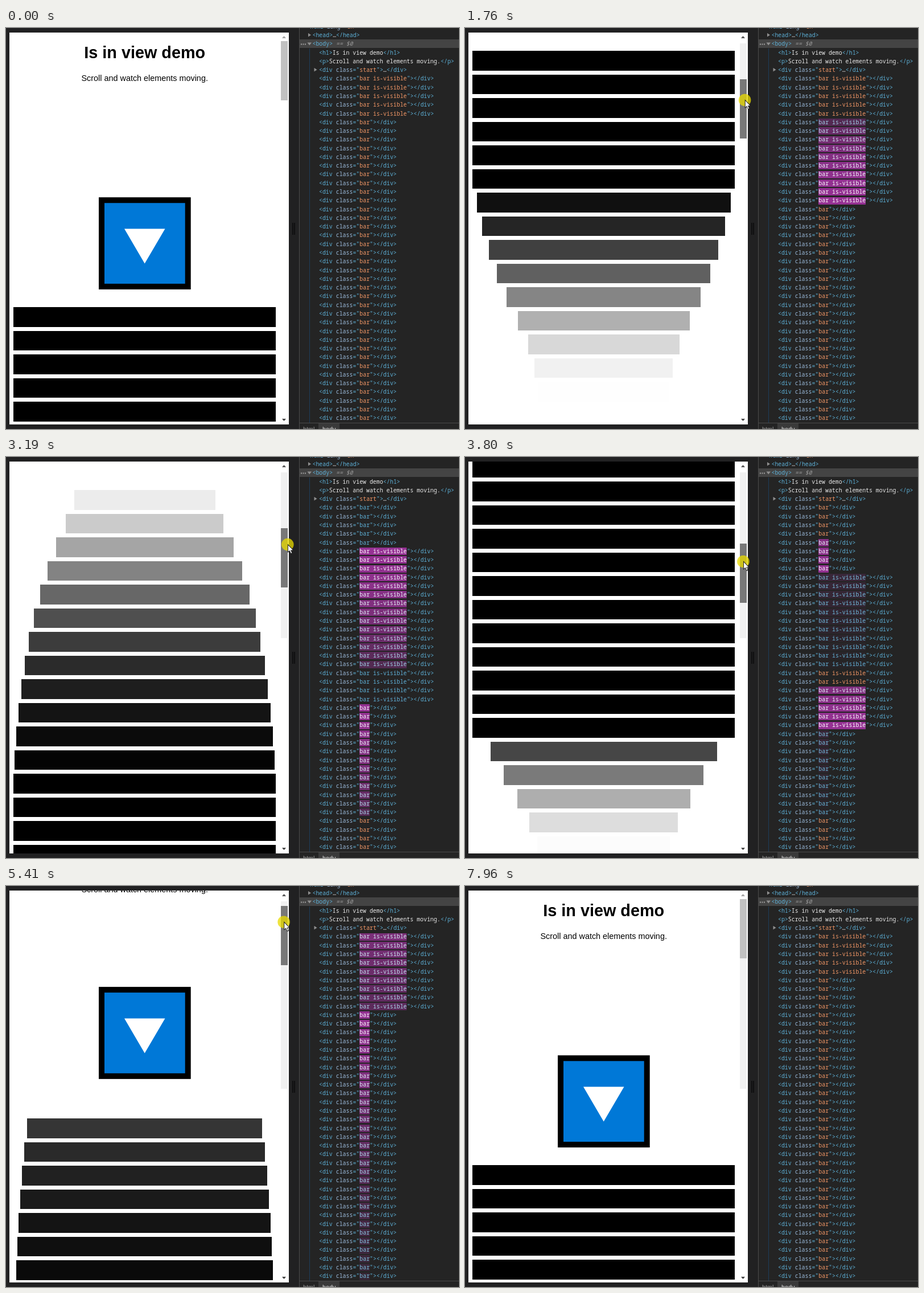
Animation, 796 px wide and 704 px high, one loop 7990 ms. Source, as an HTML page with a canvas:

```html
<!DOCTYPE html>
<html lang="en">
<head>
<meta charset="utf-8">
<title>Is in view demo</title>
<style>
html, body { margin: 0; width: 100%; height: 100%; overflow: hidden; background: #222; }
canvas { display: block; }
</style>
</head>
<body>
<canvas id="stage" width="796" height="704"></canvas>
<script>
const ctx = document.getElementById('stage').getContext('2d');
const LOOP = 7990, BARS = 50, ROWS = 40, PITCH = 41.5, ROW = 15.28, CHAR = 5.94;
const PER_THUMB = 6.69;   // page pixels per scrollbar pixel
const LAG = 52;           // delay before a class changes
const FADE = 500, FLASH = 1400;
const BLUE = '#5db0d7', NAME = '#9bbbdc', VALUE = '#f29766', LIGHT = '#e8e8e8';

// turning points of the scroll: [time, offset]
const turns = [[1200, 0], [2586, 1276], [3300, 645], [3470, 645], [3830, 866], [4377, 1533], [5592, 0]];

const mix = (a, b, k) => a + (b - a) * k;
const clamp = v => Math.min(1, Math.max(0, v));
const swing = k => (1 - Math.cos(Math.PI * k)) / 2;

// cubic-bezier(.25, .1, .25, 1)
function ease(x) {
  x = clamp(x);
  if (x === 0 || x === 1) return x;
  let lo = 0, hi = 1, u;
  for (let i = 0; i < 24; i++) {
    u = (lo + hi) / 2;
    if (.75 * u * (1 - u) + u ** 3 < x) lo = u; else hi = u;
  }
  return .3 * u * (1 - u) ** 2 + 3 * u * u * (1 - u) + u ** 3;
}

function scrollAt(t) {
  const next = turns.findIndex(([time]) => time > t);
  if (next < 1) return 0;
  const [t0, a] = turns[next - 1], [t1, b] = turns[next];
  return mix(a, b, swing((t - t0) / (t1 - t0)));
}

const thumbAt = t => 23 + scrollAt(t) / PER_THUMB;
const inView = (n, s) => s < 516 + PITCH * n && s > PITCH * n - 206;

// class changes of every bar
const changes = Array.from({ length: BARS }, (_, n) => {
  const list = [];
  let on = inView(n, 0);
  for (let t = 0; t < LOOP; t += 2) {
    if (inView(n, scrollAt(t - LAG)) !== on) list.push({ t, on: on = !on });
  }
  return list;
});

function barState(n, t) {
  let on = inView(n, 0), from = +on, at = -1e5;
  const level = now => mix(from, +on, ease((now - at) / FADE));
  for (const c of changes[n]) {
    if (c.t > t) break;
    from = level(c.t);
    on = c.on;
    at = c.t;
  }
  return { on, level: level(t), age: t - at };
}

function rect(color, x, y, w, h) {
  ctx.fillStyle = color;
  ctx.fillRect(x, y, w, h);
}

// rectangle with its edges on whole pixels
function crisp(color, x, y, w, h) {
  const left = Math.round(x), top = Math.round(y);
  rect(color, left, top, Math.round(x + w) - left, Math.round(y + h) - top);
}

function poly(color, ...pts) {
  ctx.fillStyle = color;
  ctx.beginPath();
  for (let i = 0; i < pts.length; i += 2) ctx.lineTo(pts[i], pts[i + 1]);
  ctx.closePath();
  ctx.fill();
}

function page(t, states) {
  ctx.save();
  ctx.beginPath();
  ctx.rect(6, 8, 491, 688);
  ctx.clip();
  rect('#fff', 6, 8, 491, 688);
  ctx.translate(0, -Math.round(scrollAt(t)));

  ctx.fillStyle = '#000';
  ctx.textAlign = 'center';
  ctx.font = 'bold 28.8px "Liberation Sans", Arial, sans-serif';
  ctx.fillText('Is in view demo', 243.7, 53);
  ctx.font = '14.4px "Liberation Sans", Arial, sans-serif';
  ctx.fillText('Scroll and watch elements moving.', 243.7, 93);
  ctx.textAlign = 'left';

  // bouncing button: alternate, one second each way
  const phase = (t + 1028) % 2000 / 1000;
  const y = mix(153.5, 297.3, ease(phase < 1 ? phase : 2 - phase));
  rect('#000', 163, y, 161.7, 161.7);
  rect('#0078d7', 173, y + 10, 141.7, 141.7);
  poly('#fff', 208, y + 55.3, 279.5, y + 55.3, 243.7, y + 116.3);

  states.forEach(({ level }, n) => {
    const w = 461 * (.5 + level / 2);
    ctx.globalAlpha = level;
    crisp('#000', 243.7 - w / 2, 490.2 + PITCH * n, w, 34.3);
  });
  ctx.restore();
}

function scrollbar(t) {
  const s = scrollAt(t);
  const dragged = t > 1150 && t < 5700;
  // the track shows only as far as the thumb has been
  const reached = turns.reduce((far, [time, offset]) => time <= t ? Math.max(far, offset) : far, s);
  rect('#fff', 482, 8, 15, 688);
  if (reached > 0) crisp('#f1f1f1', 483, 27, 12, 100 + reached / PER_THUMB);
  crisp(dragged ? '#787878' : '#c1c1c1', 483, thumbAt(t), 12, 104);
  poly(s > 0 ? '#505050' : '#a3a3a3', 485, 18, 488.5, 14, 492, 18);
  poly('#404040', 485, 686, 488.5, 690, 492, 686);
}

// pairs of colour and text, set one after another
function code(x, row, ...parts) {
  const y = Math.round(12.7 + ROW * row + 3.3);
  for (let i = 0; i < parts.length; i += 2) {
    ctx.fillStyle = parts[i];
    ctx.fillText(parts[i + 1], x, y);
    x += CHAR * parts[i + 1].length;
  }
}

function inspector(states) {
  rect('#242424', 515, 0, 281, 704);
  rect('#444', 516, 20, 280, 15);
  rect('#4b4b4b', 515, 0, 1, 704);
  rect('#1d3d5c', 533, 36, 1, 657);
  ctx.font = '9.9px "Noto Sans Mono", "DejaVu Sans Mono", monospace';

  code(528, -1, BLUE, '<html ', NAME, 'lang', BLUE, '="', VALUE, 'en', BLUE, '">');
  code(538.5, 0, BLUE, '<head>', LIGHT, '…', BLUE, '</head>');
  code(538.5, 1, BLUE, '<body>');
  code(550, 2, BLUE, '<h1>', LIGHT, 'Is in view demo', BLUE, '</h1>');
  code(550, 3, BLUE, '<p>', LIGHT, 'Scroll and watch elements moving.', BLUE, '</p>');
  const open = [BLUE, '<div ', NAME, 'class', BLUE, '="'];
  code(550, 4, ...open, VALUE, 'start', BLUE, '">', LIGHT, '…', BLUE, '</div>');
  poly('#8f8f8f', 531, 9, 536, 12.2, 531, 15.5);
  poly('#8f8f8f', 529.5, 25.5, 537, 25.5, 533.2, 30.5);
  poly('#8f8f8f', 541.5, 70, 546.5, 73.3, 541.5, 76.5);
  for (let i = 0; i < 3; i++) rect('#a0a0a0', 518 + i * 3.5, 27.5, 2, 2);

  for (let n = 0; n < ROWS; n++) {
    const { on, age } = states[n];
    const text = on ? 'bar is-visible' : 'bar';
    let color = VALUE;
    if (age < FLASH) {
      const k = ease(age / FLASH);
      color = `rgb(${[93, 176, 215].map(v => Math.round(mix(255, v, k)))})`;
      crisp(`rgba(150,50,148,${1 - k})`, 621, 82.6 + ROW * n, CHAR * text.length, 13);
    }
    code(550, n + 5, ...open, color, text, BLUE, '"></div>');
  }

  ctx.font = 'italic ' + ctx.font;
  code(580, 1, '#9a9a9a', '== $0');

  rect('#242424', 516, 693, 280, 11);
  rect('#4b4b4b', 516, 693, 280, 1);
  rect('#3a3a3a', 549, 694, 37, 10);
  ctx.font = '10.8px "Liberation Sans", Arial, sans-serif';
  ctx.fillStyle = '#999';
  ctx.fillText('html', 522, 708);
  ctx.fillStyle = '#ddd';
  ctx.fillText('body', 556, 708);
}

// enters and leaves over the top edge, sways while dragging the thumb
function cursor(t) {
  const away = 1 - clamp((t - 450) / 350) + clamp((t - 5900) / 300);
  const x = 490.5 + 6.5 * Math.cos(4 * Math.PI * (t - 2650) / LOOP);
  const y = thumbAt(t + 25) + 31 - 90 * away;
  ctx.fillStyle = 'rgba(232,218,0,.76)';
  ctx.beginPath();
  ctx.arc(x, y, 10.8, 0, 7);
  ctx.fill();
  ctx.save();
  ctx.translate(x + .8, y + .5);
  poly('#222', -.7, -1.6, -.7, 14, 2.6, 11.4, 5, 16.3, 8, 15, 5.9, 10.4, 10.4, 10.2);
  poly('#fff', .3, .8, .3, 12, 2.9, 9.8, 5.3, 14.8, 6.7, 14.2, 4.4, 9.4, 8.2, 9.2);
  ctx.restore();
}

function draw(now) {
  const t = now % LOOP;
  const states = changes.map((_, n) => barState(n, t));
  rect('#212122', 0, 0, 796, 704);
  rect('#0f0f10', 503, 342, 2, 21);
  rect('#0f0f10', 506, 342, 2, 21);
  page(t, states);
  scrollbar(t);
  inspector(states);
  cursor(t);
}

const start = performance.now();
function tick() {
  draw(performance.now() - start);
  requestAnimationFrame(tick);
}
tick();
</script>
</body>
</html>
```
